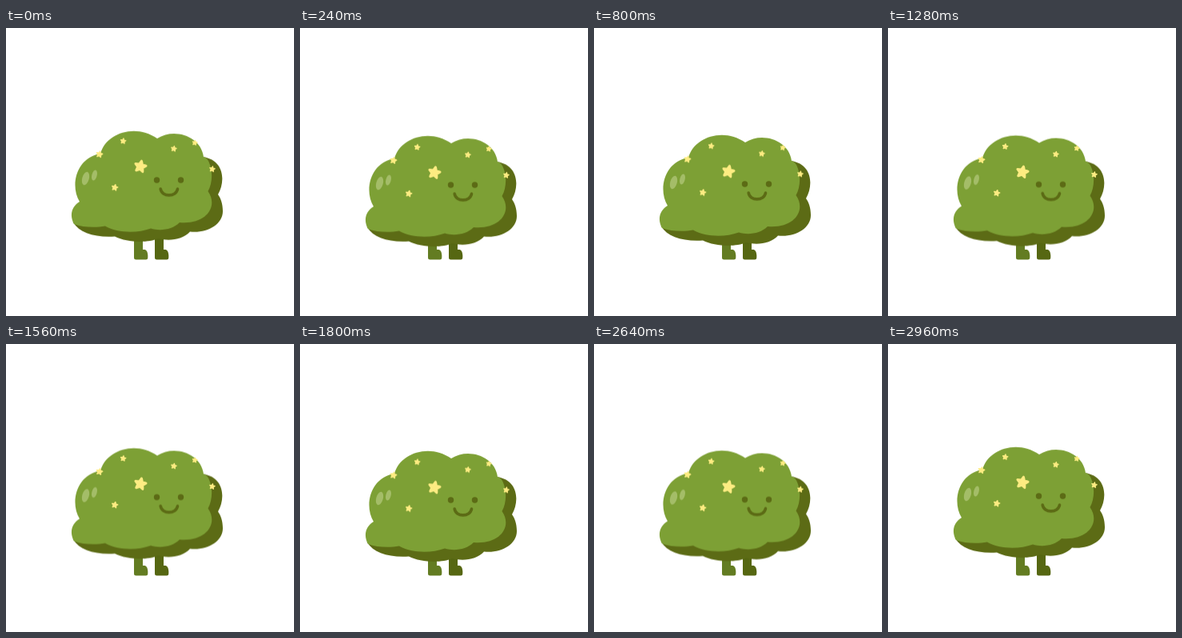
Write an HTML page without scripts that moves like this. It is 360 by 360 pixels and loops after 3 s.

```html
<!DOCTYPE html>
<html lang="en">
<head>
<meta charset="utf-8">
<title>Bouncing bush</title>
<style>
  html, body { margin: 0; width: 100%; height: 100%; overflow: hidden; background: #fff; }
  svg { display: block; width: 100%; height: 100%; }
  .bob { animation: bob 250ms cubic-bezier(.37, 0, .63, 1) -20ms infinite alternate; }
  .leaves { --drop: 6.2px; }
  .stars { --drop: 7.8px; }
  @keyframes bob {
    from { transform: translateY(0); }
    to { transform: translateY(var(--drop)); }
  }
</style>
</head>
<body>
<svg viewBox="0 0 360 360">
  <defs>
    <path id="leg" d="M0 250H11V277H13.5Q17 278 17.3 284V287Q17.3 289.5 15 289.5H2.5Q0 289.5 0 287Z"/>
    <path id="star" stroke-width="3" stroke-linejoin="round"
      d="M0-7L1.9-2.7L6.7-2.2L3.1 1L4.1 5.7L0 3.3L-4.1 5.7L-3.1 1L-6.7-2.2L-1.9-2.7Z"/>
  </defs>

  <use href="#leg" x="160" fill="#637c22"/>
  <use href="#leg" x="186" fill="#566712"/>

  <g class="bob leaves">
    <!-- shaded side -->
    <path fill="#5c6b15" d="M84 243C92 256 111 262 136 260.500C151 268 177 269 190 263C205 267 221 264 230 254.500C250 257 271 246 271 229C271 219 268 212 265 208C274 193 274 165 246 161L180 190Z"/>
    <!-- lit side -->
    <path fill="#7da035" d="M85 245C79 234 82 223 92 217C80 198 87 162 118 157C125 131 162 119 189 138C210 124 244 135 247 161Q251 162 253.500 167C259 179 258 194 252.500 204C266 223 250 246 217 243C208 252 193 254 181 250.500C163 257 139 256 124 247.500C111 250 96 249 85 245Z"/>
    <g fill="#a4bd68">
      <ellipse cx="99.500" cy="188" rx="4.300" ry="8.500" transform="rotate(15 99.500 188)"/>
      <ellipse cx="110.500" cy="184" rx="3.200" ry="6.700" transform="rotate(14 110.500 184)"/>
    </g>
    <g fill="#5c6b15">
      <circle cx="188.500" cy="190" r="3.700"/>
      <circle cx="218.500" cy="190" r="3.700"/>
    </g>
    <path d="M193.200 201C194.500 211.500 213 211.500 214.500 201" fill="none" stroke="#5c6b15" stroke-width="3.600" stroke-linecap="round"/>
  </g>

  <g class="bob stars" fill="#fdec82" stroke="#fdec82">
    <use href="#star" transform="translate(168 173) rotate(12)"/>
    <use href="#star" transform="translate(146.500 141.200) scale(.47) rotate(8)"/>
    <use href="#star" transform="translate(116.800 157.800) scale(.54) rotate(12)"/>
    <use href="#star" transform="translate(136 199.300) scale(.52) rotate(12)"/>
    <use href="#star" transform="translate(209.800 150.800) scale(.47) rotate(10)"/>
    <use href="#star" transform="translate(236 143.400) scale(.43) rotate(10)"/>
    <use href="#star" transform="translate(257.800 176.200) scale(.47) rotate(10)"/>
  </g>
</svg>
</body>
</html>
```
